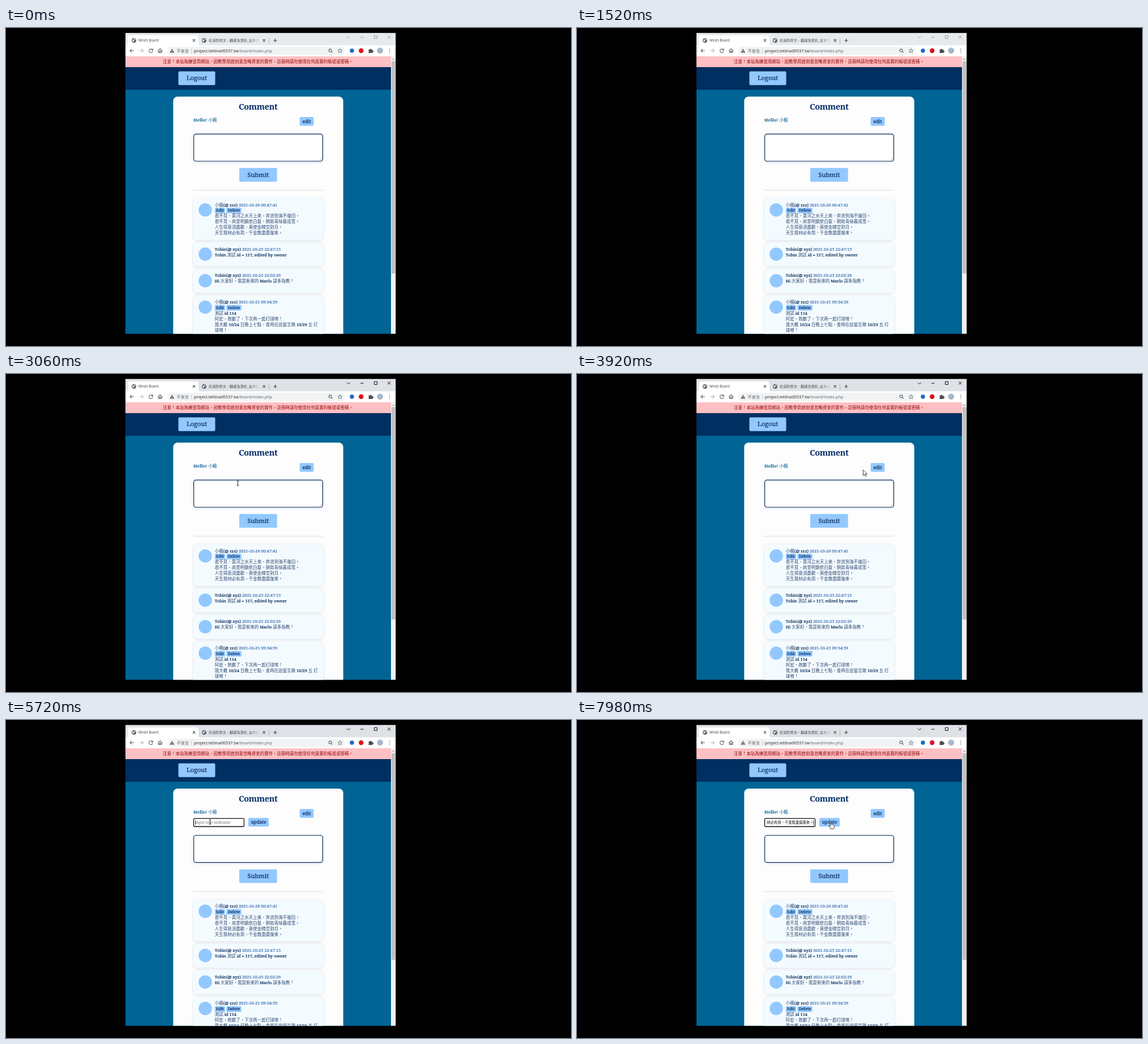
Write an HTML page that moves like this. It is 998 px wide and 561 px high and loops after 8000 ms.

```html
<!DOCTYPE html>
<html lang="zh-Hant-TW">
<head>
<meta charset="utf-8">
<title>Message board</title>
<style>
  html, body { margin: 0; width: 100%; height: 100%; overflow: hidden; background: #000; }
  svg { display: block; width: 998px; height: 561px; }
  text { font-family: "Noto Serif", "Noto Sans CJK TC", "Noto Sans CJK", serif; fill: #0a2c5c; }
  .ui { font-family: "Open Sans", "Noto Sans CJK TC", "Noto Sans CJK", sans-serif; }
  .cjk { font-family: "Noto Sans CJK TC", "Noto Sans CJK", sans-serif; font-weight: 400; stroke: none; }
  .medium { stroke: #0a2c5c; stroke-width: .22px; }
  .message .cjk { fill: #2b4670; }
  .strong .cjk { font-weight: 500; }
  .line { fill: none; stroke: #5f6368; stroke-width: 1.1; }
  .soft { filter: drop-shadow(0 1.5px 2.5px rgba(40, 70, 110, .16)); }
</style>
</head>
<body>
<svg id="stage" viewBox="0 0 998 561"></svg>
<script>
const NAVY = '#0a2c5c', BUTTON = '#93c8ff', GREY = '#5f6368', DATE = '#3f70b0';
const LATIN = 7.4, CJK = 7.5;
const LOOP = 8000, SHIFT = 16.4;
const FOCUS = 2700, OPEN = 4400, CLICK = 5400, PASTE = 6420;

const rect = (x, y, w, h, fill, rx = 0, extra = '') =>
  `<rect x="${x}" y="${y}" width="${w}" height="${h}" fill="${fill}" rx="${rx}" ${extra}/>`;
const circle = (x, y, r, fill) => `<circle cx="${x}" cy="${y}" r="${r}" fill="${fill}"/>`;
const line = (d, extra = '') => `<path class="line" d="${d}" ${extra}/>`;
const text = (x, y, size, str, extra = '', cjkSize = size) => {
  const body = str.replace(/[\u3000-\u9fff\uff00-\uffef]+/g,
    run => `<tspan class="cjk" font-size="${cjkSize}">${run}</tspan>`);
  return `<text x="${x}" y="${y}" font-size="${size}" ${extra}>${body}</text>`;
};
const button = (x, y, w, h, label, size, id = '') =>
  rect(x, y, w, h, BUTTON, 2) +
  text(x + w / 2, y + h / 2 + size * .34, size, label, `class="medium" text-anchor="middle" ${id && `id="${id}"`}`);
const globe = x => circle(x, 22, 4, GREY) +
  `<path d="M${x - 2.8} 20.5l2.3.3 1 1.3-1.2 1.2-.4 1.7-1.3-2zM${x + .6} 18.8l2 1.4-.6 1.3-1.8-.8z" fill="#fff"/>`;
const cross = (x, y, r) => `M${x - r} ${y - r}l${2 * r} ${2 * r}m0 ${-2 * r}l${-2 * r} ${2 * r}`;

// Browser frame
const chrome = () =>
  rect(211, 8.5, 477.5, 24, '#dee1e6', 0, 'id="strip"') +
  '<path d="M212 31q3 0 3-3V17q0-4 4-4h117q4 0 4 4v11q0 3 3 3z" fill="#fff"/>' +
  rect(211, 30.5, 477.5, 19.5, '#fff') +
  globe(226) + globe(350) +
  text(234, 24.3, 6.2, 'Mira’s Board', 'class="ui" style="fill:#3c4043"') +
  text(358, 24.4, 6.2, '松溪酌原文、翻譯及賞析_言木古', 'class="ui" style="fill:url(#fade)"') +
  line(cross(332, 22, 2) + cross(455.8, 22, 2), 'style="stroke:#3c4043"') +
  line('M472.3 22h6.4M475.5 18.8v6.4', 'style="stroke:#3c4043"') +
  line('M464.5 17.5v9.5', 'style="stroke:#9a9da2;stroke-width:.7"') +
  line(`M602 14.8l3 3 3-3M626 16.3h5.5M650.5 13.5h5v5h-5z${cross(676.7, 16, 2.6)}`, 'id="controls" style="stroke-width:1"') +
  line('M226 40h-7m3.2-3.2L219 40l3.2 3.2') +
  line('M235.5 40h7m-3.2-3.2l3.2 3.2-3.2 3.2', 'style="stroke:#b8babd"') +
  line('M258.6 38.2a3.3 3.3 0 1 0 .5 2.8M259.3 36.4v2.5h-2.6') +
  line('M268.2 40.3l4-3.7 4 3.7M269.5 39.5v4h1.9v-2.6h1.7v2.6h1.9v-4') +
  rect(285, 33, 313.5, 14.5, '#f1f3f4', 7.2) +
  `<path d="M293.3 36.4l4 7.2h-8z" fill="${GREY}"/><path d="M293.3 39v2.2m0 .7v.8" stroke="#fff" stroke-width=".8"/>` +
  text(301.5, 42.8, 7.2, '不安全', `class="ui" style="fill:${GREY}"`) +
  line('M327.8 36v8.5', 'style="stroke:#b5b8bc;stroke-width:.7"') +
  text(332, 42.6, 7.35, `project.lettina00537.tw<tspan fill="${GREY}">/board/index.php</tspan>`, 'class="ui" style="fill:#202124"') +
  line('M574.4 41.2l2.2 2.3M575 39.5a2.4 2.4 0 1 1-4.8 0a2.4 2.4 0 1 1 4.8 0') +
  line('M590 36.4l1.1 2.5 2.7.2-2.1 1.8.7 2.7-2.4-1.5-2.4 1.5.7-2.7-2.1-1.8 2.7-.2z', 'style="stroke-width:.8"') +
  circle(611, 40, 3.7, '#1769c9') + circle(627.3, 40, 4.2, '#dd1120') +
  `<path d="M640.4 38h2.2a1.3 1.3 0 1 1 2.6 0h2.2v2.2a1.3 1.3 0 1 1 0 2.4v1.5h-7v-2.2a1.3 1.3 0 0 0 0-2.2z" fill="#4a4d51"/>` +
  circle(660.7, 39.8, 5.4, 'url(#avatar)') +
  [37, 40, 43].map(y => circle(677.6, y, .8, GREY)).join('');

// A comment is placed by the middle of its heading line
const comment = (y, height, name, date, lines, own) => {
  const first = own ? y + 19.8 : y + 10;
  const row = (rowY, str) => text(368.8, rowY + 2.6, LATIN, str, 'class="medium message"', CJK);
  return rect(331, y - 11.5, 229, height, '#f4fbff', 7, 'class="soft"') +
    circle(352, y + 9, 11.8, BUTTON) +
    row(y, `${name} <tspan style="fill:${DATE};stroke:${DATE}">${date}</tspan>`) +
    (own ? button(368.8, y + 5, 18.2, 10, 'Edit', 7.3) + button(389.3, y + 5, 26.5, 10, 'Delete', 7.2) : '') +
    lines.map((str, i) => row(first + i * 10, str)).join('');
};

const page = () =>
  rect(211, 50, 469, 490, '#006595') +
  rect(211, 69, 469, 40, '#002f61') +
  rect(211, 50, 469, 19, '#ffc0c3') +
  text(277, 62.4, 7.47, '注意！本站為練習用網站，因教學用途刻意忽略資安的實作，註冊時請勿使用任何真實的帳號或密碼。',
    'class="strong" style="fill:#8b0000"') +
  button(304.5, 76.5, 65, 24.2, 'Logout', 10.9) +
  rect(295.3, 121, 300.4, 440, '#fdfdfe', 8) +
  text(445.3, 143.5, 14.6, 'Comment', 'text-anchor="middle" style="font-weight:700;letter-spacing:-.4px;fill:#032c66"') +
  text(331, 164.5, 7.9, 'Hello! 小楓', 'class="strong" style="font-weight:700;fill:#005b8e"', CJK) +
  button(518.7, 157, 24.8, 15.5, 'edit', 8.4, 'edit') +
  `<g id="nickname">
    <path id="underline" d="M331 188h89.5" stroke="${NAVY}" stroke-width="1.2"/>
    ${rect(331.5, 173.6, 89, 14.4, '#fff', 2, 'id="ring" stroke="#101010" stroke-width="1.3"')}
    ${text(334.6, 183.3, 6.3, 'input new nickname', 'id="hint" style="fill:#757575"')}
    <g id="typed" clip-path="url(#field)">${text(417.3, 183.1, 6.3, '天生我材必有用，千金散盡還復來。', 'text-anchor="end" style="fill:#111"')}</g>
    ${rect(0, 177, .8, 8, '#111', 0, 'id="caret"')}
    ${button(428, 172.8, 36, 15.2, 'update', 8.2, 'update')}
  </g>
  <g id="flow">
    ${rect(331.6, 187.1, 227.8, 47.9, '#fff', 4, `class="soft" stroke="${NAVY}" stroke-width="1.2"`)}
    ${line('M553.5 233.3l4.2-4.2M556 233.3l1.7-1.7', 'style="stroke:#888;stroke-width:.6"')}
    ${button(412, 247, 66.8, 24.2, 'Submit', 11.1)}
    ${rect(331, 285.6, 229, 1, '#d9dbde')}
    ${comment(312, 73.5, '小楓(@ zzz)', '2021-10-26 00:47:41', ['君不見，黃河之水天上來，奔流到海不復回。',
      '君不見，高堂明鏡悲白髮，朝如青絲暮成雪。', '人生得意須盡歡，莫使金樽空對月。', '天生我材必有用，千金散盡還復來。'], true)}
    ${comment(390, 42, 'Tobin(@ xyz)', '2021-10-25 22:47:15', ['Tobin 測試 id = 117, edited by owner'])}
    ${comment(436.8, 42, 'Tobin(@ xyz)', '2021-10-25 22:02:29', ['Hi 大家好，我是新來的 Marlo 請多指教！'])}
    ${comment(483.5, 100, '小楓(@ zzz)', '2021-10-21 09:34:59', ['測試 id 114', '阿宏，抱歉了，下次再一起打球唷！',
      '我大概 10/24 日晚上七點，會再在這留言揪 10/29 五 打', '球唷！'], true)}
  </g>` +
  rect(680, 50, 8.5, 490, '#f1f1f1') +
  rect(681, 58.5, 6.7, 374.5, '#c1c1c1', 0, 'id="thumb"') +
  '<path d="M682 56l2.3-2.6 2.3 2.6z" fill="#a3a3a3"/>';

// Pointers are drawn around the middle of the visible shape
const pointers = {
  beam: '<path d="M-1.9-4.2q1.9 0 1.9 1V3.2q0 1-1.9 1M1.9-4.2Q0-4.2 0-3.2M1.9 4.2Q0 4.2 0 3.2" fill="none" stroke="#111" stroke-width=".9"/>',
  arrow: '<path d="M-3-5v10l2.3-2.2 1.6 3.6 1.6-.7L.9 2.2H4z" fill="#fff" stroke="#111" stroke-width=".8"/>',
  hand: '<path d="M-2.4 1V-4.6q0-1.2 1-1.2t1 1.2V-1.6q1.4-.5 1.7.4 1.3-.4 1.6.5 1.5-.2 1.5 1V3q0 1.5-1 3H-2L-4.8 1.6q-.6-1.2.5-1.4.8 0 1.9 1.5z" fill="#fff" stroke="#111" stroke-width=".8" stroke-linejoin="round"/>'
};

const stage = document.getElementById('stage');
stage.innerHTML = `<defs>
  <linearGradient id="fade"><stop offset=".84" stop-color="#4a4d52"/><stop offset="1" stop-color="#4a4d52" stop-opacity=".1"/></linearGradient>
  <linearGradient id="avatar" x2=".6" y2="1"><stop stop-color="#8ccbe0"/><stop offset="1" stop-color="#bda9bc"/></linearGradient>
  <clipPath id="field"><rect x="334.5" y="174" width="84" height="14"/></clipPath>
  <clipPath id="window"><rect x="211" y="8.5" width="477.5" height="531"/></clipPath>
</defs><g clip-path="url(#window)">${page()}${chrome()}</g>
<g id="pointer">${Object.entries(pointers).map(([k, v]) => `<g id="${k}">${v}</g>`).join('')}</g>`;

const $ = id => document.getElementById(id);
const show = (id, on) => $(id).setAttribute('visibility', on ? 'inherit' : 'hidden');

// time, x, y
const path = [
  [FOCUS, 409.5, 193], [3300, 409.5, 193], [4150, 530, 170], [4750, 530, 170],
  [5250, 360.5, 180], [6400, 360.5, 180], [6700, 438, 188], [7000, 438, 188],
  [7500, 450, 186], [LOOP, 450, 186]
];
// time, shape
const shapes = [[0, 'beam'], [3380, 'arrow'], [4060, 'hand'], [4800, 'arrow'], [5110, 'beam'], [6500, 'arrow'], [6620, 'hand']];

function position(t) {
  const i = path.findIndex(p => p[0] > t);
  if (i <= 0) return path[0].slice(1);
  const [t0, x0, y0] = path[i - 1], [t1, x1, y1] = path[i];
  const u = (t - t0) / (t1 - t0), e = u * u * (3 - 2 * u);
  return [x0 + (x1 - x0) * e, y0 + (y1 - y0) * e];
}

function render(t) {
  const open = t >= OPEN, clicked = t >= CLICK, pasted = t >= PASTE, focused = t >= FOCUS;
  const shape = shapes.filter(s => s[0] <= t).pop()[1];

  $('strip').setAttribute('fill', focused ? '#dee1e6' : '#e7eaed');
  $('controls').style.stroke = focused ? '#111' : '#9a9da1';
  $('thumb').setAttribute('height', open ? 364.5 : 374.5);
  $('flow').setAttribute('transform', `translate(0 ${open ? SHIFT : 0})`);

  show('nickname', open);
  show('underline', !clicked);
  show('ring', clicked);
  show('hint', !pasted);
  show('typed', pasted);
  show('caret', clicked && (t - (pasted ? PASTE : CLICK)) % 1060 < 530);
  $('caret').setAttribute('x', pasted ? 417.2 : 334.4);
  $('edit').setAttribute('text-decoration', shape === 'hand' && t < CLICK ? 'underline' : 'none');

  show('pointer', focused);
  for (const k in pointers) show(k, k === shape);
  $('pointer').setAttribute('transform', `translate(${position(t).join(' ')})`);
}

const start = performance.now();
(function tick() {
  render((performance.now() - start) % LOOP);
  requestAnimationFrame(tick);
})();
</script>
</body>
</html>
```
